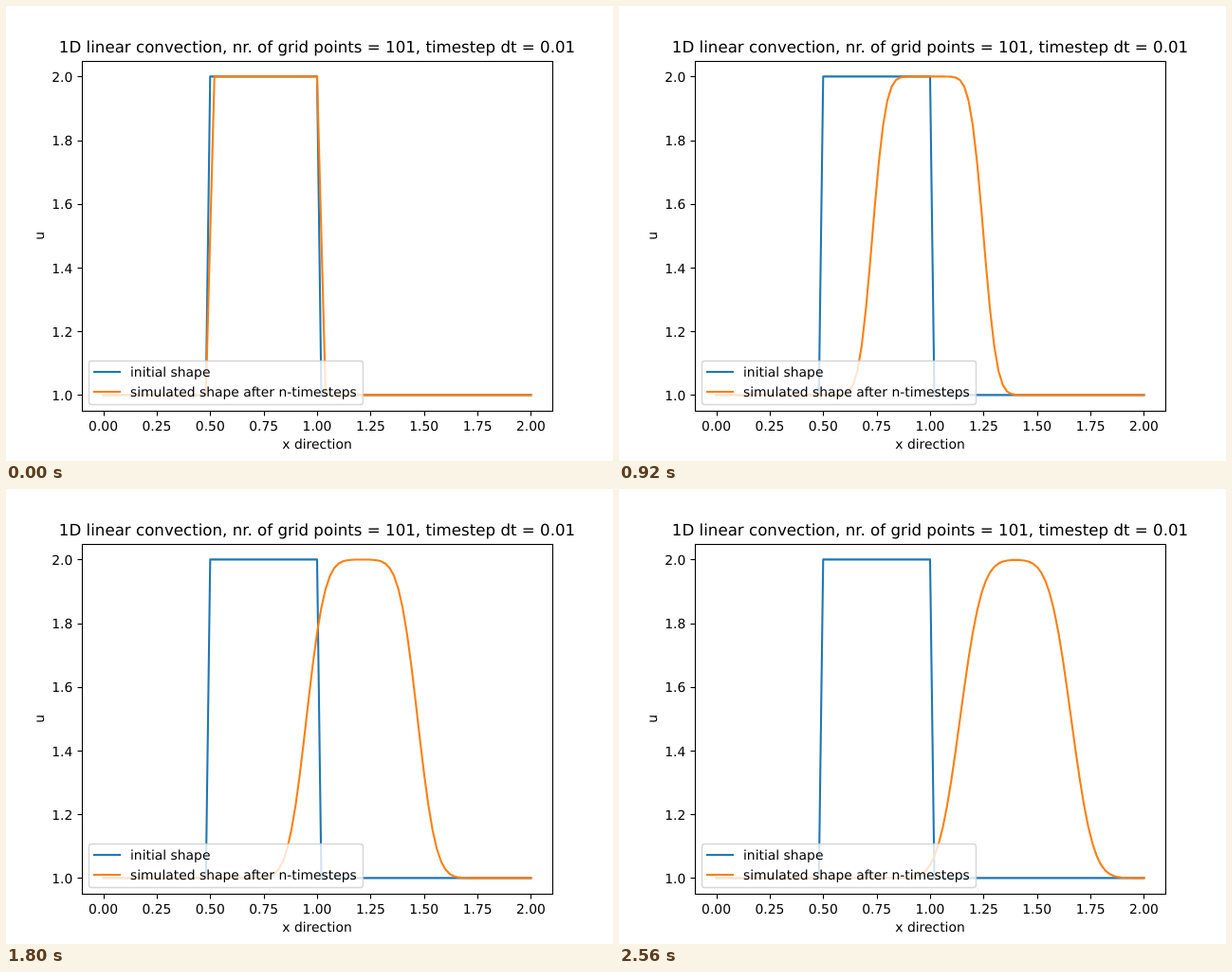
Animation, 640 px wide and 480 px high, one loop 2.6 s. Source, as an HTML page with a canvas:

```html
<!DOCTYPE html>
<html lang="en">
<head>
<meta charset="utf-8">
<title>1D linear convection</title>
<style>
  html, body { margin: 0; width: 100%; height: 100%; overflow: hidden; background: #fff; }
  canvas { display: block; }
</style>
</head>
<body>
<canvas id="plot" width="640" height="480"></canvas>
<script>
const ctx = document.getElementById('plot').getContext('2d');

const STEP_MS = 40, STEPS = 65;
const POINTS = 101, DX = 2 / (POINTS - 1), DT = 0.01, SPEED = 1;
const BLUE = '#1f77b4', ORANGE = '#ff7f0e';
const FONT_SIZE = 13.889, TITLE_SIZE = 16.667;
const LINE = 2.083, HAIRLINE = 1.111;
const AXES = { left: 80, right: 576, top: 57.6, bottom: 427.2 };

const toX = x => AXES.left + (x + 0.1) / 2.2 * (AXES.right - AXES.left);
const toY = u => AXES.bottom - (u - 0.95) / 1.1 * (AXES.bottom - AXES.top);
const snap = v => Math.round(v) + 0.5;

// First-order upwind scheme
const advance = u => u.map((v, i) => i ? v - SPEED * DT / DX * (v - u[i - 1]) : v);

const initial = Array.from({ length: POINTS }, (_, i) => i >= 25 && i <= 50 ? 2 : 1);
const profiles = [];
for (let u = initial; profiles.length < STEPS;) profiles.push(u = advance(u));

function stroke(points, color, width, cap = 'square') {
  ctx.strokeStyle = color;
  ctx.lineWidth = width;
  ctx.lineCap = cap;
  ctx.lineJoin = 'round';
  ctx.beginPath();
  for (const [x, y] of points) ctx.lineTo(x, y);
  ctx.stroke();
}

function label(text, x, y, align = 'center', size = FONT_SIZE) {
  ctx.font = `${size}px "DejaVu Sans", sans-serif`;
  ctx.textRendering = 'geometricPrecision';
  ctx.textAlign = align;
  ctx.textBaseline = 'alphabetic';
  ctx.fillStyle = '#000';
  ctx.fillText(text, x, y);
}

function drawCurve(u, color) {
  stroke(u.map((v, i) => [toX(i * DX), toY(v)]), color, LINE);
}

function drawAxes() {
  const left = snap(AXES.left), right = snap(AXES.right);
  const top = snap(AXES.top), bottom = snap(AXES.bottom);

  for (let i = 0; i <= 8; i++) {
    const x = toX(i / 4);
    stroke([[snap(x), bottom], [snap(x), bottom + 5]], '#000', HAIRLINE, 'butt');
    label((i / 4).toFixed(2), x, 448);
  }
  for (let i = 0; i <= 5; i++) {
    const u = 1 + i / 5, y = toY(u);
    stroke([[left - 5, snap(y)], [left, snap(y)]], '#000', HAIRLINE, 'butt');
    label(u.toFixed(1), 70.3, Math.round(y + 5.5), 'right');
  }
  ctx.strokeStyle = '#000';
  ctx.lineWidth = HAIRLINE;
  ctx.lineJoin = 'miter';
  ctx.strokeRect(left, top, right - left, bottom - top);

  label('1D linear convection, nr. of grid points = 101, timestep dt = 0.01', 328, 49, 'center', TITLE_SIZE);
  label('x direction', 328, 467);
  ctx.save();
  ctx.translate(40, 242.4);
  ctx.rotate(-Math.PI / 2);
  label('u', 0, 0);
  ctx.restore();
}

function drawLegend() {
  ctx.beginPath();
  ctx.roundRect(87.5, 374.5, 289, 46, 2.8);
  ctx.fillStyle = 'rgba(255, 255, 255, 0.8)';
  ctx.fill();
  ctx.strokeStyle = 'rgba(204, 204, 204, 0.8)';
  ctx.lineWidth = 1.389;
  ctx.stroke();

  const entry = (text, color, y) => {
    stroke([[93, y], [120, y]], color, LINE);
    label(text, 131, y + 5, 'left');
  };
  entry('initial shape', BLUE, 386);
  entry('simulated shape after n-timesteps', ORANGE, 407);
}

function draw() {
  const step = Math.floor(performance.now() / STEP_MS) % STEPS;
  ctx.fillStyle = '#fff';
  ctx.fillRect(0, 0, 640, 480);
  drawCurve(initial, BLUE);
  drawCurve(profiles[step], ORANGE);
  drawAxes();
  drawLegend();
  requestAnimationFrame(draw);
}
draw();
</script>
</body>
</html>
```
